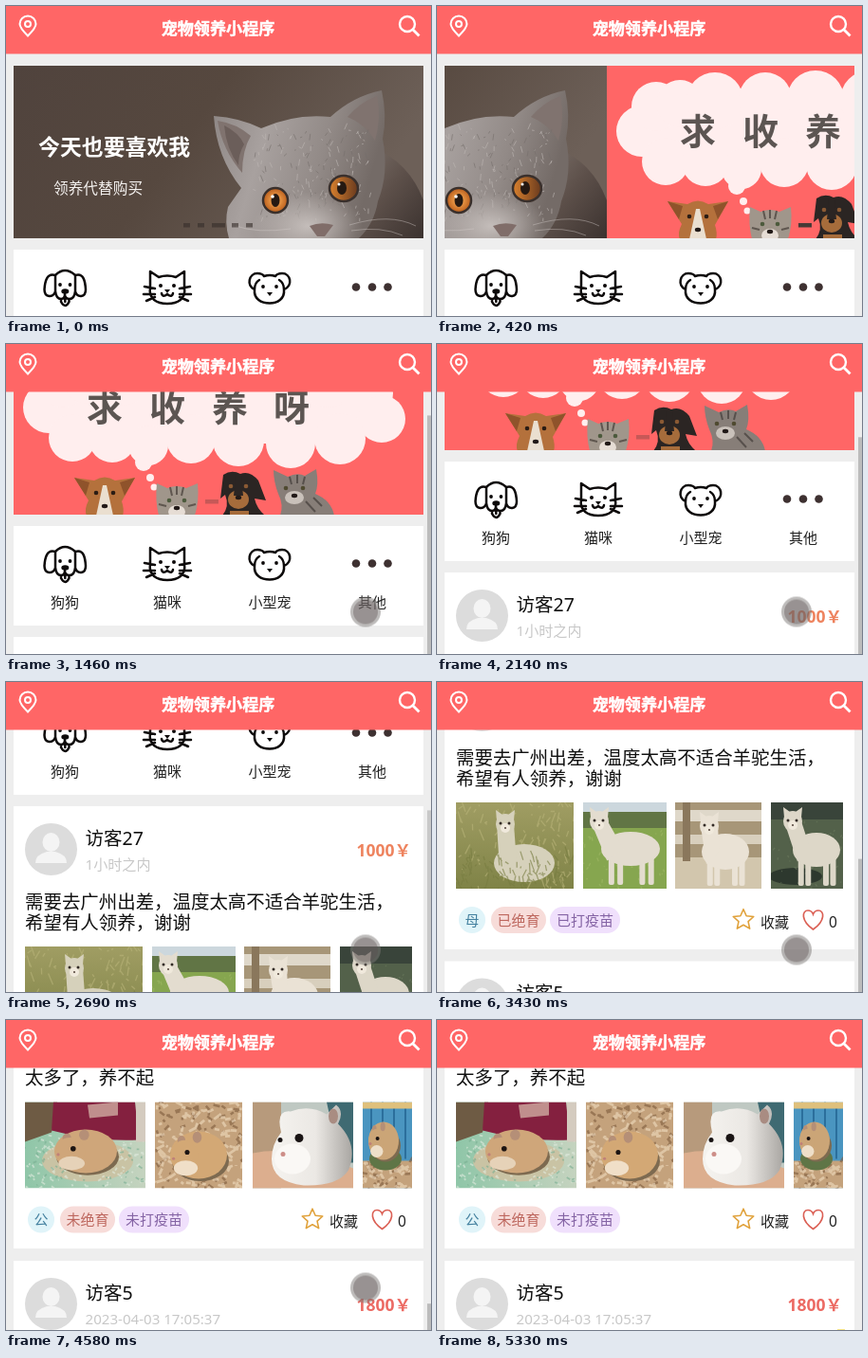
An HTML page that plays this animation: 448 px wide and 327 px high, repeating every 5.4 s.

```html
<!DOCTYPE html>
<html lang="zh-CN">
<head>
<meta charset="utf-8">
<title>宠物领养小程序</title>
<style>
@property --scroll { syntax: "<number>"; inherits: true; initial-value: 0; }
html, body { margin: 0; width: 100%; height: 100%; overflow: hidden; background: #eee; }
svg text { font-family: "Noto Sans", "Noto Sans CJK SC", "Noto Sans CJK", sans-serif; }
#stage { display: block; width: 100vw; height: 100vh; animation: scroll 5400ms step-end infinite; }
#page { transform: translateY(calc(var(--scroll) * -1px)); }
#thumb { transform: translateY(calc(53.5px + var(--scroll) * .337px)); animation: thumb 5400ms step-end infinite; }
#slides { animation: swipe 5400ms infinite; }
#dash { animation: dash 5400ms step-end infinite; }
#pointer { animation: pointer 5400ms step-end infinite; }
#hint { animation: hint 5400ms step-end infinite; }
.icon { fill: none; stroke: #0d0a0a; stroke-width: 2.5; stroke-linecap: round; stroke-linejoin: round; }
.dot { fill: #0d0a0a; stroke: none; }
.middle { text-anchor: middle; }

@keyframes swipe {
  0%, .5% { transform: translateX(0); animation-timing-function: cubic-bezier(.333, .667, .667, 1); }
  20.18%, 100% { transform: translateX(-432px); }
}
/* six wheel notches of about 121.5px */
@keyframes scroll {
  0% { --scroll: 0; }
  25.74% { --scroll: 12; } 27.03% { --scroll: 65; } 28.33% { --scroll: 108; } 29.62% { --scroll: 121; }
  39.62% { --scroll: 133; } 40.92% { --scroll: 186; } 42.22% { --scroll: 230; } 43.51% { --scroll: 243; }
  52.4% { --scroll: 248; } 53.7% { --scroll: 283; } 55% { --scroll: 333; } 56.11% { --scroll: 360; } 57.4% { --scroll: 365; }
  63.51% { --scroll: 395; } 64.81% { --scroll: 460; } 66.11% { --scroll: 486; }
  72.22% { --scroll: 498; } 73.51% { --scroll: 551; } 74.81% { --scroll: 595; } 76.11% { --scroll: 608; }
  82.22% { --scroll: 638; } 83.51% { --scroll: 703; } 84.81%, 100% { --scroll: 729; }
}
@keyframes thumb {
  0% { opacity: 0; } 25.74% { opacity: 1; }
  37.03% { opacity: .75; } 39.62% { opacity: 1; }
  49.81% { opacity: .75; } 52.4% { opacity: 1; }
  95%, 100% { opacity: 0; }
}
@keyframes dash { 0% { opacity: 1; } 20.9%, 100% { opacity: .3; } }
@keyframes pointer {
  0% { opacity: 0; transform: translate(404px, 299px); }
  11.66% { opacity: 1; transform: translate(404px, 299px); }
  12.96% { opacity: 1; transform: translate(390px, 290px); }
  14.25% { opacity: 1; transform: translate(379px, 282.5px); }
  88.51% { opacity: 1; transform: translate(388px, 288px); }
  89.81% { opacity: 1; transform: translate(409px, 301px); }
  91.11% { opacity: 1; transform: translate(426px, 314px); }
  93.7%, 100% { opacity: 0; transform: translate(426px, 314px); }
}
@keyframes hint { 0% { opacity: 0; } 98.7%, 100% { opacity: 1; } }
</style>
</head>
<body>
<svg id="stage" viewBox="0 0 448 327" preserveAspectRatio="none">
  <defs>
    <clipPath id="banner"><rect x="8" y="63" width="432" height="182"/></clipPath>
    <linearGradient id="wall" y2=".3"><stop stop-color="#50433d"/><stop offset=".5" stop-color="#56483f"/><stop offset="1" stop-color="#6d6058"/></linearGradient>
    <linearGradient id="back" x2="1" y2="1"><stop stop-color="#81766f"/><stop offset=".5" stop-color="#5d504a"/><stop offset="1" stop-color="#3b322f"/></linearGradient>
    <linearGradient id="fur" x2="1" y2=".25"><stop stop-color="#8c8583"/><stop offset=".35" stop-color="#a8a19f"/><stop offset=".7" stop-color="#928a87"/><stop offset="1" stop-color="#746b67"/></linearGradient>
    <radialGradient id="muzzle"><stop stop-color="#c4bdba"/><stop offset="1" stop-color="#c4bdba" stop-opacity="0"/></radialGradient>
    <radialGradient id="iris"><stop offset=".25" stop-color="#f0a04c"/><stop offset="1" stop-color="#b95d1c"/></radialGradient>
    <linearGradient id="shadedIris"><stop stop-color="#d9812e"/><stop offset="1" stop-color="#693a1e"/></linearGradient>
    <linearGradient id="meadow" x2="0" y2="1"><stop stop-color="#a09d63"/><stop offset="1" stop-color="#7f8347"/></linearGradient>
    <linearGradient id="blanket"><stop stop-color="#8fc6a8"/><stop offset="1" stop-color="#c5d3bf"/></linearGradient>
    <linearGradient id="whiteFur"><stop stop-color="#f5f3ef"/><stop offset=".55" stop-color="#ebe8e4"/><stop offset="1" stop-color="#aaa7a3"/></linearGradient>
  </defs>

  <rect width="448" height="327" fill="#eee"/>
  <g id="page">
    <g clip-path="url(#banner)">
      <g id="slides">
        <g>
          <rect x="8" y="63" width="432" height="182" fill="url(#wall)"/>
          <path d="M388 150Q425 165 440 205V245H360Z" fill="url(#back)"/>
          <path d="M219 116Q247 118 269 129Q305 113 342 117Q366 95 396 89Q402 116 397 140Q404 176 392 206Q388 230 372 245H235Q230 228 234 212L248 192Q222 160 219 116Z" fill="url(#fur)"/>
          <path d="M223 121Q243 124 258 137Q249 152 249 176Q228 152 223 121ZM391 95Q396 118 389 142Q378 124 360 117Q374 101 391 95Z" fill="#80736f"/>
          <path d="M230 126Q246 134 251 146Q245 156 245 168Q232 150 230 126Z" fill="#6b5e5a"/>
          <g id="hairs"></g>
          <ellipse cx="318" cy="232" rx="58" ry="36" fill="url(#muzzle)"/>
          <path d="M320 232Q332 227 345 231L336 243H328Z" fill="#806d69"/>
          <path d="M300 235Q265 240 242 232M362 231Q405 218 432 232M364 237Q395 232 418 242" stroke="#d3cdca" stroke-width=".7" fill="none" opacity=".6"/>
          <g stroke="#3a302c" stroke-width="2.500">
            <circle cx="284" cy="205" r="13" fill="url(#iris)"/><ellipse cx="356" cy="192.500" rx="15" ry="13.500" fill="url(#shadedIris)"/>
          </g>
          <ellipse cx="284" cy="205" rx="4.500" ry="7" fill="#251912"/><ellipse cx="354" cy="192" rx="5" ry="7" fill="#251912"/>
          <circle cx="281" cy="201" r="1.800" fill="#fff"/><circle cx="351" cy="188" r="1.500" fill="#fff"/>
          <path d="M187 229h7v4.500h-7zM202 229h7v4.500h-7zM217 229h14v4.500h-14zM238 229h7v4.500h-7zM253 229h7v4.500h-7z" fill="#362d2a" opacity=".6"/>
          <text x="34" y="157" font-size="22.900" font-weight="700" fill="#fff">今天也要喜欢我</text>
          <text x="50" y="197.500" font-size="15.700" fill="#f4f1ef">领养代替购买</text>
        </g>
        <g transform="translate(432)">
          <rect x="8" y="63" width="432" height="182" fill="#f66"/>
          <g id="cloud" fill="#fee"></g>
          <g font-size="38" font-weight="700" fill="#5c5552" class="middle">
            <text x="104" y="145.500">求</text><text x="170" y="145.500">收</text><text x="236" y="145.500">养</text><text x="301" y="145.500">呀</text>
          </g>
          <rect id="dash" x="210" y="229" width="14" height="4.500" fill="#463a36"/>
          <g id="pets">
            <path d="M87 230L72 206L93 209Q104 202 115 209L136 206L122 231Q125 240 123 246H85Q82 240 87 230Z" fill="#b4713c"/>
            <path d="M72 206L88 211L84 225ZM136 206L120 211L125 225Z" fill="#8f532b"/>
            <path d="M102 214h4L113 246H95Z" fill="#eadfd0"/>
            <path d="M159 212L170 217Q180 213 190 217L202 212Q204 230 199 246H161Q157 230 159 212Z" fill="#a0968b"/>
            <path d="M173 216l2 9M180 215v9M187 216l-2 9M161 234l8 2M200 234l-8 2" stroke="#5f564f" stroke-width="2"/>
            <ellipse cx="180" cy="242" rx="9" ry="7" fill="#e6ddd5"/>
            <path d="M229 203Q238 197 247 202Q257 198 266 209L274 230L262 228Q264 238 273 246H228Q236 236 231 224L226 228Z" fill="#2b2523"/>
            <ellipse cx="245" cy="229" rx="11" ry="10" fill="#a66c3b"/><path d="M236 241h20v5h-20z" fill="#a66c3b"/>
            <path d="M242 204h6l2 21h-10z" fill="#2b2523"/>
            <path d="M282 198L297 205Q307 200 315 204L327 197Q330 213 326 223Q343 230 346 246H289Q293 235 287 223Q282 210 282 198Z" fill="#877e78"/>
            <path d="M299 205l2 8M307 203v9M315 205l-2 8M324 227l9 9M316 231l10 11" stroke="#57504c" stroke-width="2"/>
            <ellipse cx="304" cy="227" rx="10" ry="7" fill="#c9c1ba"/>
          </g>
        </g>
      </g>
    </g>

    <rect x="8" y="257" width="432" height="105" fill="#fff"/>
    <g class="icon">
      <path d="M52 284Q62 274 73 284M52 284C43 281 41 291 40.500 299C40.500 308 50 308 52 301ZM73 284C82 281 83.500 291 84 299C84 308 75 308 73 301ZM52 301Q53 309 58 309Q62 309 62 304Q62 309 67 309Q72 309 73 301M58 310V312Q62.500 320 66.500 312V310M62.300 308v4"/>
      <ellipse class="dot" cx="62.300" cy="301" rx="4" ry="2.800"/><circle class="dot" cx="57" cy="294" r="1.900"/><circle class="dot" cx="67.500" cy="294" r="1.900"/>
      <path d="M152 297V280L161 286Q170 283 179 286L188 280V297C190 309 181 314 170 314C159 314 150 309 152 297ZM146 296l11 2M145 304h12M148 311l9-4M194 296l-11 2M195 304h-12M192 311l-9-4M164 303Q165 308 170 304Q175 308 176 303"/>
      <circle class="dot" cx="163" cy="295" r="2"/><circle class="dot" cx="177" cy="295" r="2"/><path class="dot" d="M167 299h6l-3 4z"/>
      <path d="M262 299C253 295 256 282 265 282Q270 282 272 285Q278 283 284 285Q286 282 291 282C300 282 303 295 293 299C294 309 286 313.500 278 313.500C269 313.500 261 309 262 299ZM262 299Q262 292 267 289M293 299Q293 292 288 289"/>
      <circle class="dot" cx="271" cy="296" r="1.900"/><circle class="dot" cx="285" cy="296" r="1.900"/><path class="dot" d="M275 302h6l-3 4z"/>
    </g>
    <g fill="#3e3131"><circle cx="369" cy="296.500" r="4.300"/><circle cx="386" cy="296.500" r="4.300"/><circle cx="402.500" cy="296.500" r="4.300"/></g>
    <g class="middle" font-size="15" fill="#222">
      <text x="62" y="342.500">狗狗</text><text x="170" y="342.500">猫咪</text><text x="278" y="342.500">小型宠</text><text x="386" y="342.500">其他</text>
    </g>
    <g id="posts"></g>
  </g>

  <rect id="thumb" x="444" width="4" height="300" fill="#bcbcbc"/>
  <rect width="448" height="50.500" fill="#f66"/>
  <text class="middle" x="223.500" y="29.500" font-size="17.100" font-weight="700" fill="#fff" stroke="#fff" stroke-width=".5">宠物领养小程序</text>
  <g fill="none" stroke="#fff" stroke-width="2">
    <path d="M23 31.500Q14.500 23 14.500 19A8.500 8.500 0 0 1 31.500 19Q31.500 23 23 31.500Z"/><circle cx="23" cy="19" r="3"/>
    <circle cx="423" cy="19" r="8" stroke-width="2.400"/><path d="M429 25l6.500 6.500" stroke-width="2.800"/>
  </g>
  <g id="pointer">
    <circle r="16" fill="#7d7a78" opacity=".5"/><circle r="13" fill="#5a5050" opacity=".38"/>
  </g>
  <rect id="hint" x="422" y="326" width="8" height="1" fill="#f6e58a"/>
</svg>

<script>
const byId = id => document.getElementById(id);
let seed = 7;
const random = () => (seed = seed * 16807 % 2147483647) / 2147483647;

const ellipse = (x, y, rx, ry, fill) => `<ellipse cx="${x}" cy="${y}" rx="${rx}" ry="${ry}" fill="${fill}"/>`;
const disc = (x, y, r, fill) => ellipse(x, y, r, r, fill);
const rect = (x, y, w, h, fill, r = 0) => `<rect x="${x}" y="${y}" width="${w}" height="${h}" rx="${r}" fill="${fill}"/>`;
const path = (d, fill) => `<path d="${d}" fill="${fill}"/>`;
const label = (x, y, size, fill, text, more = '') => `<text x="${x}" y="${y}" font-size="${size}" fill="${fill}" ${more}>${text}</text>`;

// loose strokes for grass, fur and wood shavings
function strokes(w, top, bottom, count, dx, dy, color, thick = 1.3) {
  let d = '';
  for (let i = 0; i < count; i++) {
    const x = random() * w, y = top + random() * (bottom - top);
    d += `M${x.toFixed(1)} ${y.toFixed(1)}l${((random() - .5) * dx).toFixed(1)} ${((random() - .5) * dy).toFixed(1)}`;
  }
  return `<path d="${d}" stroke="${color}" stroke-width="${thick}" fill="none" opacity=".6"/>`;
}

function alpaca(hx, hy, bx, by, rx, ry, fill, foot) {
  const legs = foot ? [-.65, -.35, .4, .7].map(k => rect(bx + k * rx - 3, by, 6, foot - by, fill, 2)).join('') : '';
  return legs + ellipse(bx, by, rx, ry, fill)
    + path(`M${hx - 9} ${hy}L${hx + 9} ${hy}L${bx - rx * .25} ${by}L${bx - rx * .8} ${by + ry * .7}Z`, fill)
    + path(`M${hx - 9} ${hy - 4}l-1-11l7 5h6l7-5l-1 11z`, fill)
    + ellipse(hx, hy, 10, 11, fill) + ellipse(hx, hy + 4, 5, 5, '#f0e9dc')
    + disc(hx - 5, hy - 1, 1.5, '#332b26') + disc(hx + 4, hy - 1, 1.5, '#332b26') + disc(hx, hy + 4, 1.1, '#5b4b43');
}

function hamster(x, y, rx, ry, fill, belly) {
  return ellipse(x + 2, y + ry * .25, rx, ry * .85, '#7d6a50') + ellipse(x, y, rx, ry, fill)
    + ellipse(x - rx * .05, y - ry * .75, rx * .16, ry * .24, '#b58f77') + ellipse(x - rx * .6, y - ry * .6, rx * .14, ry * .22, '#b58f77')
    + ellipse(x - rx * .5, y + ry * .02, rx * .48, ry * .65, fill) + ellipse(x - rx * .45, y + ry * .55, rx * .42, ry * .32, belly)
    + disc(x - rx * .4, y - ry * .12, Math.max(2, rx * .085), '#1c1412') + disc(x - rx * .88, y + ry * .15, 1.6, '#c08078');
}

const alpacas = [
  [20, 124, rect(0, 0, 124, 91, 'url(#meadow)') + strokes(124, 0, 91, 120, 10, 24, '#b9b57a')
    + alpaca(52, 23, 72, 64, 32, 20, '#d6d1bb') + strokes(124, 55, 91, 90, 10, 24, '#777c40')],
  [154, 88, rect(0, 0, 88, 91, '#86a64f') + rect(0, 0, 88, 12, '#ccd7dd') + rect(0, 10, 88, 17, '#617545')
    + strokes(88, 30, 91, 50, 4, 8, '#a0ba66') + alpaca(17, 20, 50, 49, 31, 18, '#e3dccf', 87)],
  [251, 91, rect(0, 0, 91, 91, '#a79678') + rect(0, 8, 91, 12, '#dfd8ca') + rect(0, 34, 91, 10, '#d8cfbd') + rect(0, 58, 91, 33, '#d2c6ad')
    + rect(8, 0, 8, 62, '#8a775c') + alpaca(36, 25, 53, 52, 25, 19, '#eae2d5', 88)],
  [352, 76, rect(0, 0, 76, 91, '#53614a') + rect(0, 0, 76, 18, '#39443a') + ellipse(26, 78, 28, 9, '#2d382e')
    + strokes(76, 20, 91, 50, 5, 6, '#6b7a5e') + alpaca(23, 20, 48, 50, 25, 18, '#ddd7c8', 88)]
];

const shavings = (w, top, n) => rect(0, top, w, 91 - top, '#c4a27c')
  + strokes(w, top, 91, n, 14, 12, '#7d5a3c', 2.5) + strokes(w, top, 91, n * 1.6, 16, 14, '#f0dcc0', 2.8);
const hamsters = [
  [20, 127, rect(0, 0, 127, 91, 'url(#blanket)') + ellipse(66, 62, 48, 22, '#c9c3a4') + strokes(127, 35, 91, 110, 8, 6, '#e2ecdf', 1.8)
    + strokes(127, 40, 91, 60, 8, 6, '#78ad92', 1.8) + path('M0 0H34L28 32L0 42Z', '#6e5b44')
    + path('M30 0H116L120 40Q72 42 28 30Z', '#84203f') + path('M66 3L98 0V14L68 17Z', '#c08f8d') + rect(117, 0, 10, 42, '#d4cbbf')
    + hamster(64, 52, 33, 23, '#cfa67a', '#e6d2b8')],
  [157, 92, shavings(92, 0, 80) + hamster(46, 56, 30, 25, '#d3a875', '#f0dfc8')],
  [260, 106, rect(0, 0, 106, 91, '#bfc8c2') + rect(0, 0, 30, 91, '#b79a7c') + path('M78 0H106V64H92Z', '#3f6a72') + path('M0 54Q45 45 106 70V91H0Z', '#dcae8e')
    + path('M30 32Q24 8 40 10Q60 2 78 13L88 3Q97 10 90 23Q112 45 101 72Q90 89 54 88Q20 84 20 60Q20 45 30 32Z', 'url(#whiteFur)')
    + ellipse(42, 60, 19, 16, '#faf8f5') + ellipse(85, 15, 5, 8, '#a98c82') + disc(49, 38, 4.5, '#191414') + disc(29, 40, 2.5, '#191414') + disc(32, 55, 2.5, '#cd8e88')],
  [376, 52, rect(0, 0, 52, 91, '#4a95c0') + [8, 20, 32, 44].map(x => rect(x, 0, 2, 60, '#2b6f9c')).join('') + rect(0, 0, 52, 7, '#dfc07c')
    + shavings(52, 62, 28) + ellipse(24, 60, 17, 12, '#5f7546') + hamster(22, 41, 16, 20, '#cba577', '#eedfc9')]
];

const tagColors = [['#e0f4f9', '#43809f'], ['#f7dcd9', '#bd665d'], ['#f0e0fc', '#8463a4']];
function tag(text, i, y) {
  const x = [23, 57, 119][i], w = [28, 58, 74][i], [back, ink] = tagColors[i];
  return rect(x, y - 14, w, 28, back, 14) + label(x + w / 2, y + 5.5, 15, ink, text, 'class="middle"');
}

function star(x, y) {
  const points = Array.from({ length: 10 }, (_, i) => {
    const r = i % 2 ? 5.3 : 11.3, a = i * Math.PI / 5;
    return `${x + r * Math.sin(a)},${y - r * Math.cos(a)}`;
  });
  return `<polygon points="${points.join(' ')}" fill="none" stroke="#e0a13a" stroke-width="1.6" stroke-linejoin="round"/>`;
}

const heart = (x, y) => `<path transform="translate(${x} ${y})" d="M0 10C-13 1 -12 -10 -5.500 -10Q-1.500 -10 0 -6Q1.500 -10 5.500 -10C12 -10 13 1 0 10Z" fill="none" stroke="#db6055" stroke-width="1.7"/>`;

function post({ top, height, name, when, price, ink, lines = [], photos = [], tags = [] }) {
  const photoTop = top + 126 + (lines.length - 1) * 22, tagY = photoTop + 124;
  let out = rect(8, top, 432, height, '#fff')
    + disc(47.5, top + 45.5, 27.5, '#dcdcdc') + ellipse(47.5, top + 38, 9, 10, '#f4f4f4')
    + path(`M31 ${top + 60}Q31 ${top + 51} 43 ${top + 48}H52Q64 ${top + 51} 64 ${top + 60}Z`, '#f4f4f4')
    + label(83.5, top + 40.5, 19.5, '#111', name) + label(83.5, top + 67.2, 15.1, '#c8c8c8', when)
    + label(427, top + 52.5, 17.5, ink, price, 'font-weight="700" text-anchor="end"')
    + lines.map((line, i) => label(20, top + 107.5 + i * 22, 19.45, '#111', line)).join('')
    + photos.map(([x, w, art]) => `<svg x="${x}" y="${photoTop}" width="${w}" height="91">${art}</svg>`).join('')
    + tags.map((text, i) => tag(text, i, tagY)).join('');
  if (tags.length) {
    out += star(323, tagY) + heart(396.5, tagY)
      + label(341, tagY + 7.5, 15, '#222', '收藏') + label(413, tagY + 7.5, 15.5, '#222', '0');
  }
  return out;
}

byId('posts').innerHTML = [
  { top: 374, height: 303, name: '访客27', when: '1小时之内', price: '1000￥', ink: '#ee835e',
    lines: ['需要去广州出差，温度太高不适合羊驼生活，', '希望有人领养，谢谢'], photos: alpacas, tags: ['母', '已绝育', '已打疫苗'] },
  { top: 689.5, height: 280.5, name: '访客5', when: '1小时之内', price: '20￥', ink: '#c9696a',
    lines: ['太多了，养不起'], photos: hamsters, tags: ['公', '未绝育', '未打疫苗'] },
  { top: 983, height: 300, name: '访客5', when: '2023-04-03 17:05:37', price: '1800￥', ink: '#ec6a63' }
].map(post).join('');

byId('cloud').innerHTML = rect(62, 95, 310, 75, '#fee') + [
  [45, 132, 27], [60, 106, 26], [85, 103, 25], [122, 100, 30], [175, 98, 28], [228, 98, 30], [285, 99, 31], [340, 102, 30],
  [380, 117, 28], [396, 144, 25], [70, 164, 25], [112, 165, 25], [150, 172, 21], [195, 165, 26], [245, 167, 27], [300, 170, 26],
  [352, 165, 27], [145, 190, 9], [152, 206, 4], [156, 216, 3.5]
].map(([x, y, r]) => disc(x, y, r, '#fee')).join('');

byId('hairs').innerHTML = '<g transform="translate(262)">' + strokes(122, 130, 225, 110, 6, 14, '#beb7b4', 1)
  + strokes(122, 130, 225, 80, 6, 14, '#766e6b', 1) + '</g>';

// eyes and nose of each small pet: centre, eye height, eye spacing, nose height, eye colour
byId('pets').innerHTML += [
  [104, 222, 9, 236, '#2a1c14'], [180, 230, 8, 238, '#4c5a3c'], [245, 215, 8, 227, '#8a5a34'], [304, 217, 9, 225, '#4f4a30']
].map(([x, y, gap, nose, eye]) => disc(x - gap, y, 2.3, eye) + disc(x + gap, y, 2.3, eye) + ellipse(x, nose, 3.2, 2.2, '#221a18')).join('');
</script>
</body>
</html>
```
